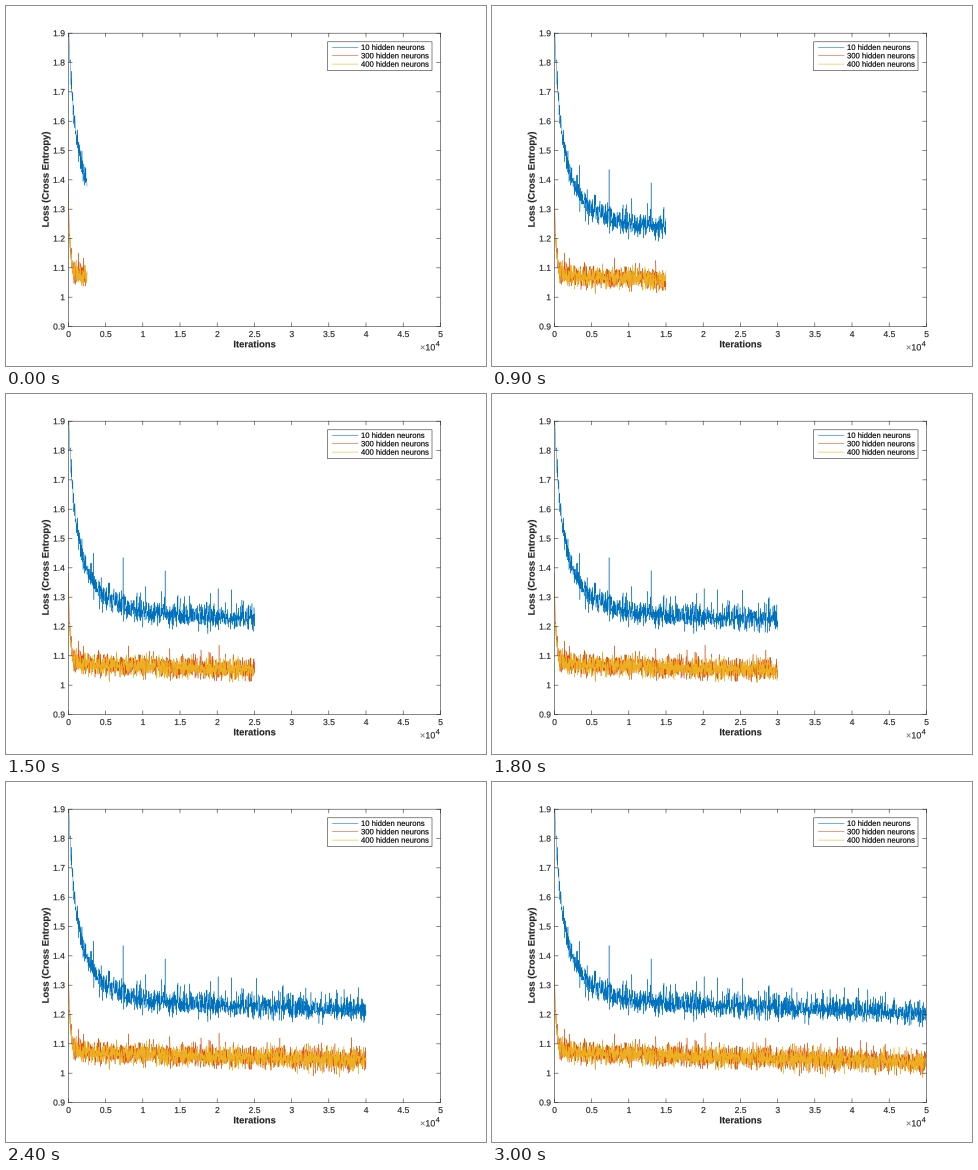
Animation of 480 by 360 pixels, one loop 3.3 s. Source, as a matplotlib script:

```python
import numpy as np
import matplotlib.pyplot as plt
from matplotlib.animation import FuncAnimation
from matplotlib.patches import PathPatch, Rectangle
from matplotlib.textpath import TextPath
from matplotlib.transforms import Affine2D

W, H, DPI = 480, 360, 100
PT = 72 / DPI                      # points per pixel
LEFT, RIGHT, TOP, BOTTOM = 62.4, 434.4, 27.2, 320.5
X_MAX, Y_MIN, Y_MAX = 50000, 0.9, 1.9
STEP = 25
INK = "#262626"
BLUE, RED, YELLOW = "#0072bd", "#d95319", "#edb120"
NAMES = ["10 hidden neurons", "300 hidden neurons", "400 hidden neurons"]

plt.rcParams["path.simplify"] = False

fig = plt.figure(figsize=(W / DPI, H / DPI), dpi=DPI, facecolor="white")
ax = fig.add_axes([0, 0, 1, 1])
ax.set_xlim(0, W)
ax.set_ylim(H, 0)
ax.axis("off")


def px(x):
    return LEFT + (RIGHT - LEFT) * x / X_MAX


def py(y):
    return BOTTOM - (BOTTOM - TOP) * (y - Y_MIN) / (Y_MAX - Y_MIN)


def line(xs, ys, color=INK, width=0.55, z=2):
    return ax.plot(xs, ys, color=color, lw=width * PT, zorder=z, snap=False)[0]


def label(x, y, s, size=8.57, color=INK, align=0.0, weight="normal", turn=0):
    """Outline text on baseline y; align 0, 0.5, 1 is left, centre, right."""
    font = {"family": "Liberation Sans", "weight": weight}
    path = TextPath((0, 0), s, size=size, prop=font)
    shift = -align * path.get_extents().x1
    place = Affine2D().translate(shift, 0).scale(1, -1)
    place.rotate_deg(turn).translate(x, y)
    ax.add_patch(PathPatch(place.transform_path(path), fc=color, ec=color,
                           lw=0.15 * PT, zorder=7, snap=False))


def frame_box(x0, y0, x1, y1, z, fill="none"):
    ax.add_patch(Rectangle((x0, y0), x1 - x0, y1 - y0, fc=fill, ec=INK,
                           lw=0.55 * PT, zorder=z, snap=False))


def draw_axes():
    frame_box(LEFT, TOP, RIGHT, BOTTOM, 4)
    tick = 3.72
    for i in range(11):
        x, y = px(i * 5000), py(Y_MIN + i / 10)
        for edge, d in ((BOTTOM, -tick), (TOP, tick)):
            line([x, x], [edge, edge + d], z=4)
        for edge, d in ((LEFT, tick), (RIGHT, -tick)):
            line([edge, edge + d], [y, y], z=4)
        label(x, 331, f"{i / 2:g}", align=0.5)
        label(58.6, y + 3, f"{Y_MIN + i / 10:.2g}", align=1)
    label(248.4, 341.3, "Iterations", 9.43, align=0.5, weight="bold")
    label(42.6, 173.7, "Loss (Cross Entropy)", 9.43, align=0.5,
          weight="bold", turn=-90)
    label(414, 344.4, "×", 9, "#777777")
    label(419.3, 344.4, "10", 9)
    label(429.7, 340.2, "4", 7.4)


def draw_legend():
    frame_box(321.5, 35.8, 426, 64.6, 5, "white")
    for i, (name, color) in enumerate(zip(NAMES, (BLUE, RED, YELLOW))):
        y = 41.3 + 8.4 * i
        line([326.5, 352], [y, y], color, z=6)
        label(355, y + 2.6, name, 7.68, "black")


steps = np.arange(0, X_MAX + STEP, STEP)


def loss(base, drift, decays, sd, skew, seed):
    """Slow drift plus exponential decays, with noise skewed upwards."""
    rng = np.random.default_rng(seed)
    y = base - drift * steps / X_MAX
    for amp, tau in decays:
        y = y + amp * np.exp(-steps / tau)
    noise = rng.normal(0, sd, steps.size)
    noise += skew * (rng.exponential(1, steps.size) - 1)
    return y + noise * (1 - np.exp(-steps / 150))


curves = [
    loss(1.255, 0.05, ((0.35, 700), (0.33, 2700)), 0.017, 0.014, 4),
    loss(1.073, 0.035, ((0.24, 160), (0.07, 600)), 0.018, 0.007, 8),
    loss(1.071, 0.035, ((0.19, 160), (0.07, 600)), 0.018, 0.005, 15),
]
# The tallest spikes of the upper curve.
for at, value in ((3400, 1.45), (7350, 1.435), (13000, 1.39)):
    curves[0][at // STEP] = value

xs = px(steps)
paths = [py(c) for c in curves]

draw_axes()
draw_legend()
clip = Rectangle((LEFT, TOP), RIGHT - LEFT, BOTTOM - TOP,
                 transform=ax.transData)
traces = [line([], [], c, 0.42, 3) for c in (BLUE, RED, YELLOW)]
for trace in traces:
    trace.set_clip_path(clip)


def update(i):
    n = max(2500, 5000 * i) // STEP + 1
    for trace, ys in zip(traces, paths):
        trace.set_data(xs[:n], ys[:n])
    return traces


anim = FuncAnimation(fig, update, frames=11, interval=300, repeat=True,
                     repeat_delay=0, blit=False)
plt.show()
```
